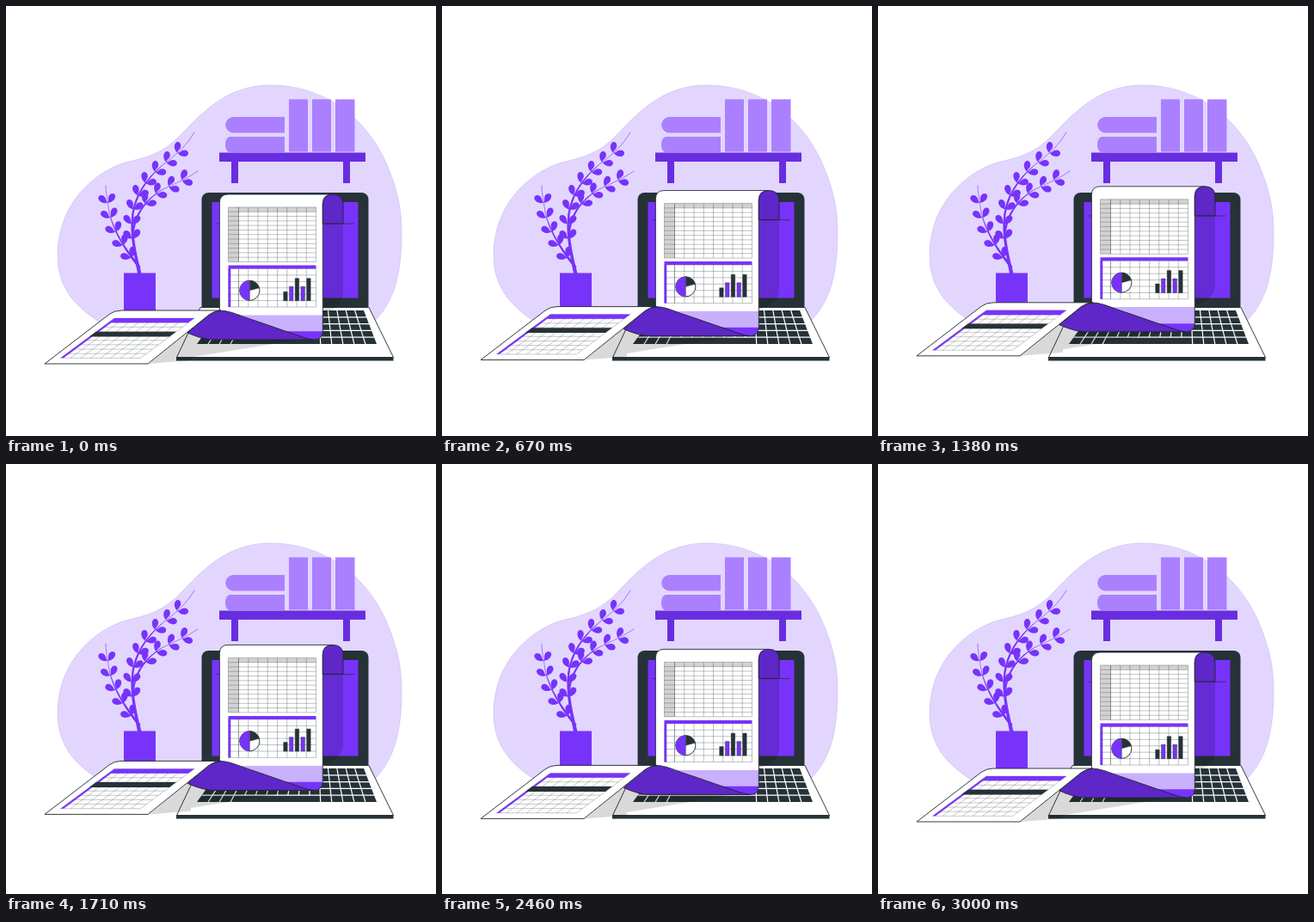
Write an HTML page that moves like this. It is 500x500 px and loops after 3040 ms.

```html
<!DOCTYPE html>
<html lang="en">
<head>
<meta charset="utf-8">
<title>Scrolling report</title>
<style>
  html, body { margin: 0; width: 100%; height: 100%; overflow: hidden; background: #fff; }
  svg { display: block; width: 100vw; height: 100vh; }
  .violet { fill: #7733fa; }
  .deep { fill: #5f26c8; }
  .ink { fill: #263238; }
  .edge { stroke: #1d262b; stroke-width: .9; stroke-linejoin: round; }
  .line { fill: none; stroke: #263238; }
  .stem { fill: none; stroke: #7733fa; stroke-linecap: round; }
</style>
</head>
<body>
<svg viewBox="0 0 500 500">
  <path fill="#e2d6ff" stroke="#b7a5e6" stroke-width=".4" d="M60 290C60 235 95 200 130 185C155 176 177 178 205 148C234 117 262 92 308 92C368 92 417 128 441 180C455 212 460 235 460 262C460 312 452 343 428 367H108C80 349 60 327 60 290Z"/>

  <g fill="#aa80ff">
    <path d="M329 108.5h22v61h-22zM356 108.5h22v61h-22zM383 108.5h22.500v61h-22.500z"/>
    <path d="M324 129V147.500H264.500A9.250 9.250 0 0 1 264.500 129Z"/>
    <path d="M324 152V170H259Q255 168 255 161T260 152Z"/>
  </g>
  <path fill="#692de0" d="M248 170.500h170v10.500h-170zM262 181h8v25h-8zM392 181h8v25h-8z"/>

  <path class="violet" d="M137 310.500h37v50h-37z"/>
  <g id="plant"></g>

  <g id="laptop">
    <rect class="ink" x="227.500" y="217" width="194" height="140" rx="8"/>
    <path class="violet" d="M239.500 228h170v111.500h-170z"/>
    <path class="edge" fill="#fff" d="M226 350.500H422L450.500 408.500H198.500Z"/>
    <path class="ink" d="M198 408h252.500v4.500H198z"/>
    <path class="ink" d="M250 354H416L431 393H222Z"/>
    <g id="keys" stroke="#fff" stroke-width="1.200"></g>
  </g>

  <g id="paper">
    <path fill="#000" fill-opacity=".15" d="M166 416L215 412V408.500L335 389L230 384L214 376Z"/>
    <path fill="#000" fill-opacity=".15" d="M368 253H392V336Q391 350 368 358Z"/>
    <path class="line" stroke-width=".8" d="M245 253.200H404.500"/>

    <path fill="#fff" d="M258 219H379L368.300 230V360H248.400V229Q248.400 219 258 219Z"/>
    <path fill="#c9b0fc" d="M248.400 359.500H368.300V379H248.400Z"/>
    <path class="violet" d="M300 378.300H368.300Q368 388 358 388H300Z"/>
    <path class="deep edge" d="M380 219Q392 219 392 231V253H368.300V230Q368.300 219 380 219Z"/>
    <path class="line edge" d="M248.400 356V229Q248.400 219 258 219H380M368.300 230V378Q368 388 358 388"/>
    <path class="deep edge" d="M211 380L236 359Q243 353 254 354.500C264 356 270 359.500 290 366L345 385Q352 387.500 358 388H240Q228 387.500 211 380Z"/>
    <path class="edge" fill="#fff" d="M45 416L120 358.500Q126 354 134 354H250Q243 354 236 359L165 416Z"/>

    <g id="ledger"></g>
    <g id="table"></g>
    <g id="chart"></g>
  </g>
</svg>
<script>
const NS = 'http://www.w3.org/2000/svg';
const $ = id => document.getElementById(id);

function add(parent, tag, attrs) {
  const el = document.createElementNS(NS, tag);
  for (const name in attrs) el.setAttribute(name, attrs[name]);
  parent.appendChild(el);
  return el;
}

const shape = (parent, d, cls) => add(parent, 'path', { d, class: cls });
const rule = (parent, d, width) =>
  add(parent, 'path', { d, class: 'line', 'stroke-width': width, 'stroke-opacity': .75 });
const mix = (a, b, k) => a + (b - a) * k;

// Stems carry pairs of leaves, counted back from the tip.
const LEAF = 'M0 0C3.500 -.2 4.500 -3.800 8.500 -4C12.500 -4 14.300 -1 13 1.500C11 5 4 4.800 0 0Z';

function growStem(d, width, tip, gap, pairs) {
  const stem = add($('plant'), 'path', { d, class: 'stem', 'stroke-width': width });
  const len = stem.getTotalLength();
  for (let i = 0; i < pairs; i++) {
    const at = len - tip - i * gap;
    const p = stem.getPointAtLength(at);
    const q = stem.getPointAtLength(at + 2);
    const turn = Math.atan2(q.y - p.y, q.x - p.x) * 180 / Math.PI;
    for (const side of [-1, 1]) {
      add($('plant'), 'path', {
        d: LEAF, class: 'violet',
        transform: `translate(${p.x} ${p.y}) rotate(${turn + side * 46}) scale(.95 ${side * .95})`
      });
    }
  }
}

growStem('M155 311C150 290 144 266 147 243C151 218 163 200 187 181C200 171 210 162 219 147', .6, 31, 17, 8);
growStem('M148 268C150 240 165 222 185 212C200 205 213 199 223 192', .6, 21, 17, 4);
growStem('M156 306C140 285 125 265 120 240C118 225 116 218 116 209', .6, 20, 17.5, 5);
shape($('plant'), 'M153 311C148 285 143.500 264 146.300 242C150.500 217 163 200 187 180.500C163 202 152 220 148.500 243C146.500 264 152 290 157.500 311Z', 'violet');
shape($('plant'), 'M147 262C150 238 165 222 185 211.500C166 223.500 152 240 149 262Z', 'violet');
shape($('plant'), 'M155 306C140 287 125 265 119.700 238C126.500 264 141 284 156.500 303Z', 'violet');

// Keyboard: white gaps over one dark trapezoid.
const keyX = (k, y) => mix(mix(250, 416, k), mix(222, 431, k), (y - 354) / 39);
const COLS = 16, ROW = 7.8;
for (let r = 0; r < 5; r++) {
  const y = 354 + r * ROW;
  if (r) add($('keys'), 'path', { d: `M${keyX(0, y)} ${y}H${keyX(1, y)}` });
  for (let c = 1; c < COLS; c++) {
    if (r === 4 && c > 3 && c < 11) continue;
    const k = c / COLS;
    add($('keys'), 'path', { d: `M${keyX(k, y)} ${y}L${keyX(k, y + ROW)} ${y + ROW}` });
  }
}

// Slanted sheet on the desk.
const ledger = $('ledger');
const slant = y => 126 - (y - 363) * 1.35;
const band = (y0, y1, w, cls) =>
  shape(ledger, `M${slant(y0)} ${y0}h${w}L${slant(y1) + w} ${y1}h${-w}Z`, cls);
for (let i = 0; i <= 9; i++) {
  const y = 363 + i * 5.15;
  rule(ledger, `M${slant(y)} ${y}h93`, .35);
}
for (let i = 0; i <= 8; i++) {
  const x = i * 93 / 8;
  rule(ledger, `M${slant(363) + x} 363L${slant(409.3) + x} 409.3`, .35);
}
band(363, 368.3, 93, 'violet');
band(368, 409.3, 3.5, 'violet');
band(378.7, 384.5, 93, 'ink');

function grid(parent, x0, y0, x1, y1, cols, rows) {
  let d = '';
  for (let i = 0; i <= cols; i++) d += `M${mix(x0, x1, i / cols)} ${y0}V${y1}`;
  for (let i = 0; i <= rows; i++) d += `M${x0} ${mix(y0, y1, i / rows)}H${x1}`;
  rule(parent, d, .4);
}

const table = $('table');
add(table, 'path', { d: 'M258.500 234H360.500V239.300H270.500V297.500H258.500Z', fill: '#d2d2d2' });
grid(table, 258.5, 234, 270.5, 297.5, 1, 12);
grid(table, 270.5, 234, 360.5, 297.5, 8, 12);

const chart = $('chart');
grid(chart, 270.5, 305.5, 360.5, 350, 8, 6);
grid(chart, 258.5, 305.5, 270.5, 350, 1, 6);
shape(chart, 'M258.500 301.500H360.500V305.500H261.300V350H258.500Z', 'violet');
add(chart, 'circle', { cx: 283.3, cy: 330.8, r: 11.6, fill: '#fff', class: 'edge' });
shape(chart, 'M283.300 319.200A11.600 11.600 0 0 0 283.300 342.400Z', 'violet');
shape(chart, 'M283.300 330.800V319.200A11.600 11.600 0 0 1 294.500 327.800Z', 'ink');
rule(chart, 'M283.300 319.200V342.400M283.300 330.800L294.500 327.800', .6);
[10.5, 16.5, 26, 16.5, 26].forEach((h, i) =>
  add(chart, 'rect', {
    x: 322.7 + i * 6.75, y: 342.7 - h, width: 4.5, height: h,
    class: (i % 2 ? 'violet' : 'ink') + ' edge', style: 'stroke-width:.4'
  }));

// The paper floats up 10 px and back in 3 s, drawn at 24 steps a second.
const LOOP = 3040, STEP = 1000 / 24, STEPS = 72, RISE = 10;
const start = performance.now();

function draw() {
  const t = (performance.now() - start) % LOOP;
  const k = Math.min(Math.floor((t + 5) / STEP), STEPS) / STEPS;
  const lift = RISE * (1 - Math.abs(1 - 2 * k));
  $('paper').setAttribute('transform', `translate(0 ${-lift})`);
  requestAnimationFrame(draw);
}
draw();
</script>
</body>
</html>
```
